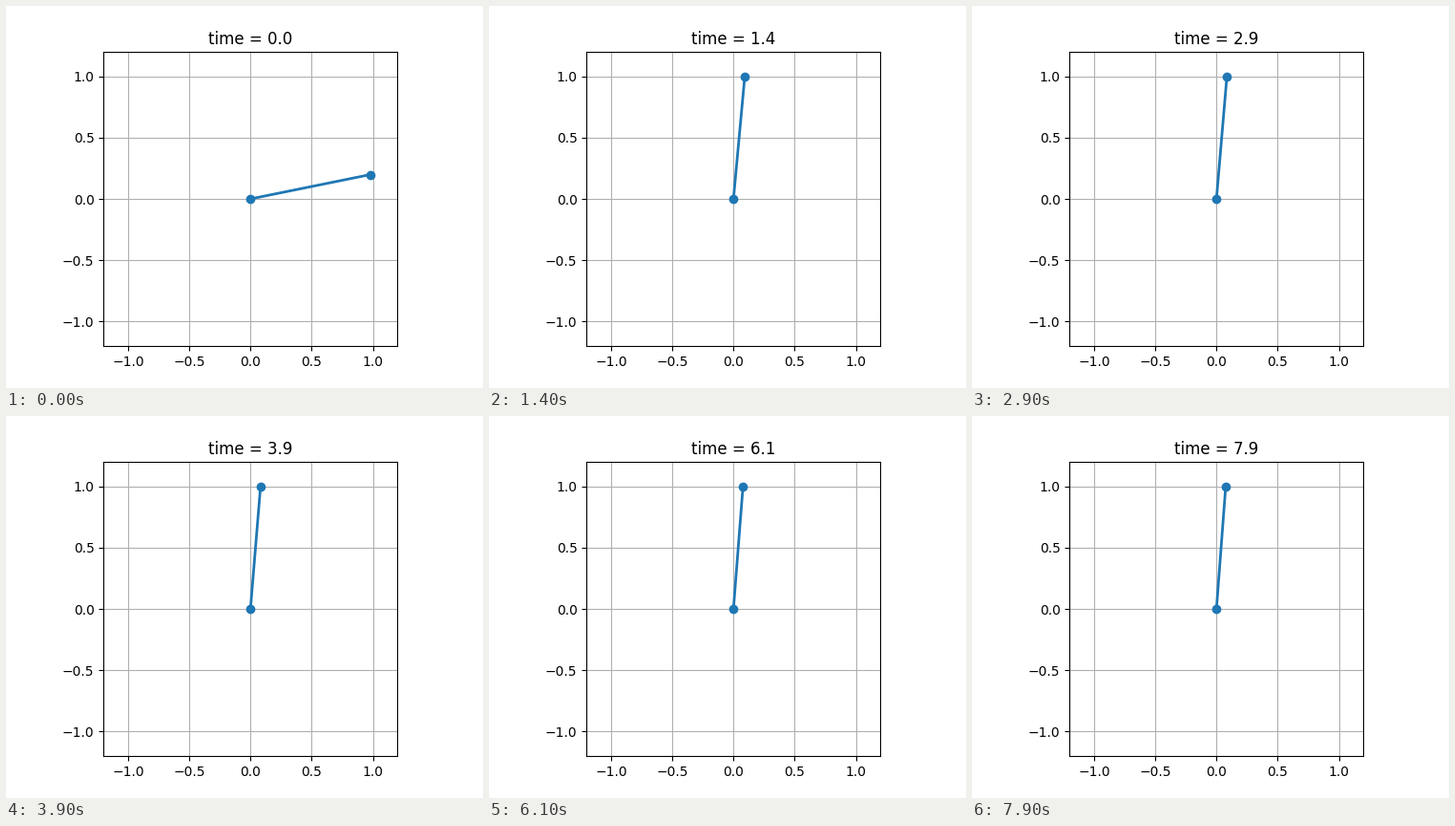
Animation, 500 px wide and 400 px high, one loop 8000 ms. Source, as a matplotlib script:

```python
import numpy as np
import matplotlib.pyplot as plt
from matplotlib.animation import FuncAnimation

FRAMES = 80
INTERVAL = 100  # ms

START, TARGET = 0.2, 1.5    # arm angle in radians
SAG, SAG_TIME = 0.0275, 4.4  # slow error removed by integral action
OMEGA = 6.5                 # fast, critically damped rise


def angle(t):
    """Quick rise towards the target followed by a slow creep."""
    rise = (TARGET - START - SAG) * (1 + OMEGA * t) * np.exp(-OMEGA * t)
    return TARGET - SAG * np.exp(-t / SAG_TIME) - rise


fig = plt.figure(figsize=(5, 4), dpi=100)
ax = fig.add_subplot(111, xlim=(-1.2, 1.2), ylim=(-1.2, 1.2))
ax.set_aspect("equal")
ax.set_xticks(np.arange(-1, 1.1, 0.5))
ax.set_yticks(np.arange(-1, 1.1, 0.5))
ax.grid()

arm, = ax.plot([], [], "o-", lw=2)
title = ax.set_title("")


def update(i):
    t = i * INTERVAL / 1000
    theta = angle(t)
    arm.set_data([0, np.cos(theta)], [0, np.sin(theta)])
    title.set_text(f"time = {t:.1f}")
    return arm, title


anim = FuncAnimation(fig, update, frames=FRAMES, interval=INTERVAL,
                     repeat=True, repeat_delay=0, blit=False)
plt.show()
```
